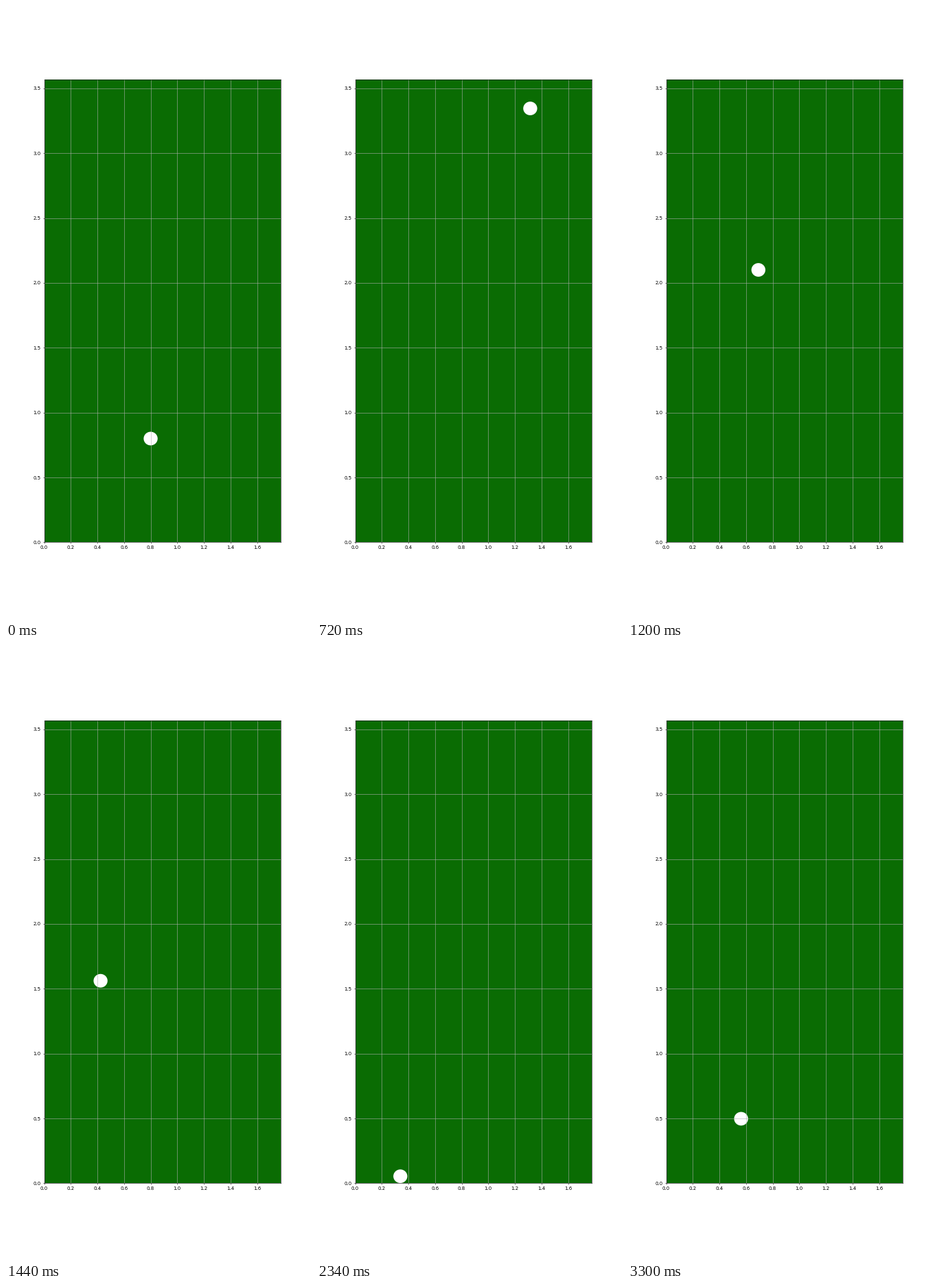
Animation of 444 by 892 pixels, one loop 3360 ms. Source, as a matplotlib script:

```python
import math

import numpy as np
import matplotlib.pyplot as plt
from matplotlib.animation import FuncAnimation
from matplotlib.patches import Circle

STAGE_W, STAGE_H, DPI = 444, 892, 50
TABLE_W, TABLE_H = 1.778, 3.569
RADIUS = 0.0525
FRAMES, INTERVAL = 112, 30
DT = INTERVAL / 1000

START = np.array([0.8, 0.8])
SPEED = 5.3662                 # m/s
SLIDING, ROLLING = 1.962, 1.083  # m/s^2, before and after the first cushion
RESTITUTION = 0.75

LOW = np.array([RADIUS, RADIUS])
HIGH = np.array([TABLE_W, TABLE_H]) - RADIUS


def next_cushion(pos, heading):
    """Distance to the first cushion on the way and the axis it stops."""
    gaps = (np.where(heading > 0, HIGH, LOW) - pos) / heading
    axis = int(np.argmin(gaps))
    return gaps[axis], axis


def roll_ball():
    """Sample each straight run from its own start until the ball rests."""
    path = []
    pos = START.copy()
    vel = SPEED * np.array([1.0, 2.0]) / math.sqrt(5)
    decel = SLIDING
    while True:
        speed = math.hypot(*vel)
        heading = vel / speed
        gap, axis = next_cushion(pos, heading)
        left = speed ** 2 - 2 * decel * gap
        end_speed = math.sqrt(max(left, 0))
        for t in np.arange(0, (speed - end_speed) / decel, DT):
            path.append(pos + heading * (speed * t - decel * t * t / 2))
        if left <= 0:
            path.append(pos + heading * speed ** 2 / (2 * decel))
            return path
        pos = pos + heading * gap
        vel = heading * end_speed
        vel[axis] *= -RESTITUTION
        decel = ROLLING


path = roll_ball()

fig = plt.figure(figsize=(STAGE_W / DPI, STAGE_H / DPI), dpi=DPI, facecolor="white")

# Margins refer to a sheet of five inches per metre.
sheet_w, sheet_h = TABLE_W * 5 * DPI, TABLE_H * 5 * DPI
ax = fig.add_axes([
    0.125 * sheet_w / STAGE_W,
    0.125 * sheet_h / STAGE_H,
    0.775 * sheet_w / STAGE_W,
    0.755 * sheet_h / STAGE_H,
])
ax.set_facecolor("#0a6c03")
ax.set_xlim(0, TABLE_W)
ax.set_ylim(0, TABLE_H)
ax.set_xticks(np.arange(9) * 0.2)
ax.set_yticks(np.arange(8) * 0.5)
ax.grid(True)

ball = Circle(START, RADIUS, facecolor="white", linewidth=0)
ax.add_patch(ball)


def draw(i):
    ball.center = tuple(path[min(i, len(path) - 1)])
    return (ball,)


anim = FuncAnimation(fig, draw, frames=FRAMES, interval=INTERVAL,
                     repeat=True, repeat_delay=0, blit=False)
plt.show()
```
